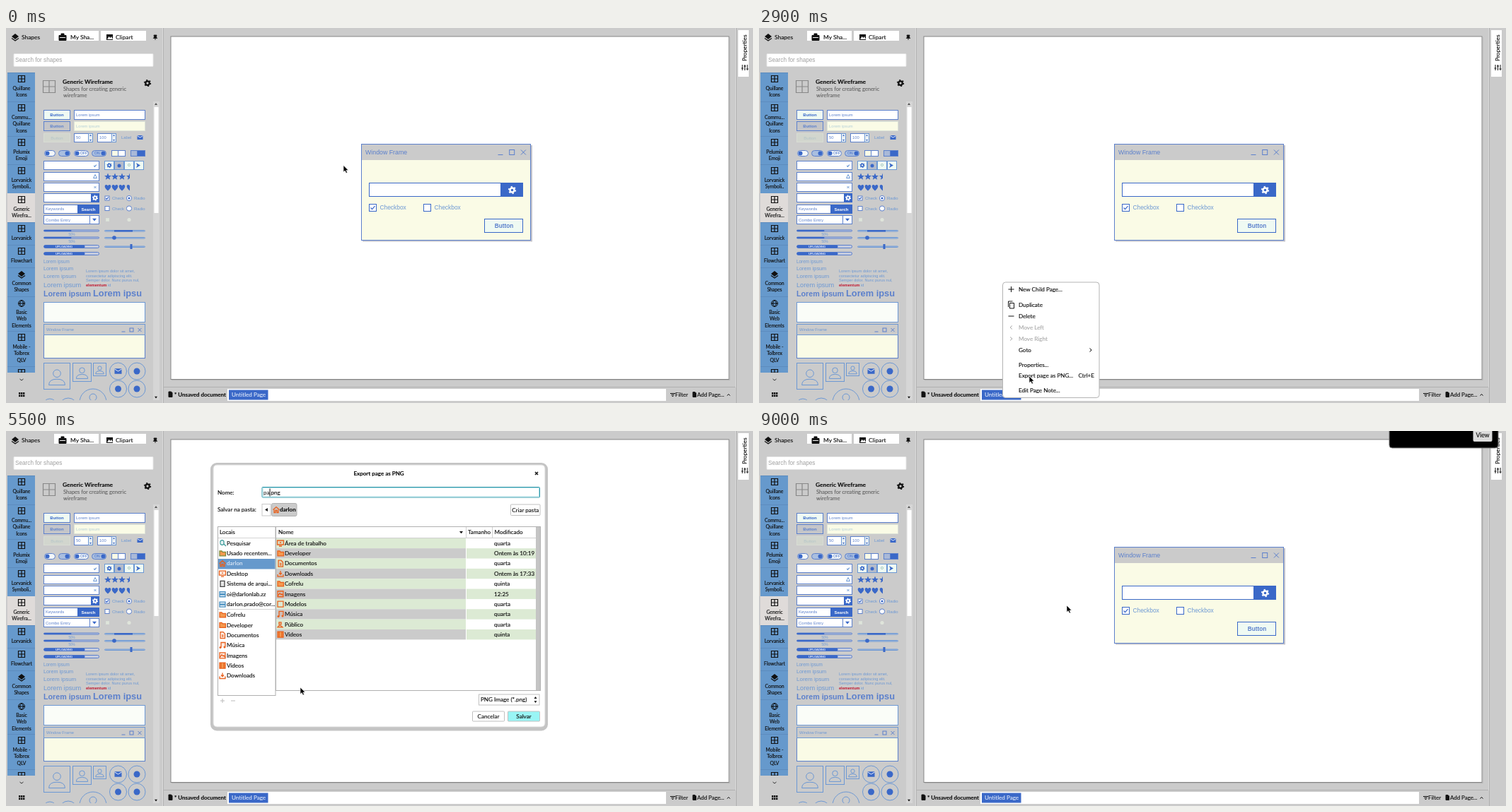
These frames come from a looping animation (1056x531 px, 9.1 s). An HTML page:

```html
<!DOCTYPE html>
<html lang="en">
<head>
<meta charset="utf-8">
<title>Export a page</title>
<style>
  html, body { margin: 0; width: 100%; height: 100%; overflow: hidden; background: #cbcbcb; }
  svg { display: block; width: 1056px; height: 531px; font-family: Lato, sans-serif; }
  svg svg { width: auto; height: auto; }
  text { white-space: pre; }
  .wire text { font-family: "Liberation Sans", Arial, sans-serif; stroke: none; }
</style>
</head>
<body>
<svg id="stage" viewBox="0 0 1056 531"></svg>
<script>
const BLUE = '#3a68c8', EDGE = '#5c80cc', SOFT = '#6c98d4', GREY = '#cbcbcb', CREAM = '#fafbe6', MINT = '#effaf3';
const ORANGE = '#e8601c', TAB = '#6699cc';

// Drawing helpers: every one returns SVG markup.
const R = (x, y, w, h, fill = 'none', stroke = 'none', rx = 0) =>
  `<rect x="${x}" y="${y}" width="${w}" height="${h}" fill="${fill}" stroke="${stroke}" rx="${rx}"/>`;
const B = (x, y, w, h, fill, stroke = EDGE, rx) => R(x + .5, y + .5, w - 1, h - 1, fill, stroke, rx);
const C = (x, y, r, fill = 'none', stroke = 'none', extra = '') =>
  `<circle cx="${x}" cy="${y}" r="${r}" fill="${fill}" stroke="${stroke}" ${extra}/>`;
const P = (d, stroke = '#000', fill = 'none', width = 1) =>
  `<path d="${d}" stroke="${stroke}" fill="${fill}" stroke-width="${width}"/>`;
const T = (x, y, text, size = 8.1, fill = '#111', extra = '') =>
  `<text x="${x}" y="${y + size * .34}" font-size="${size}" fill="${fill}" stroke="${fill}" stroke-width=".15" ${extra}>${text}</text>`;
const G = (x, y, body) => `<g transform="translate(${x} ${y})">${body}</g>`;
const MID = 'text-anchor="middle"', BOLD = ' font-weight="bold"';

const grid = (x, y, s, color = '#111', w = 1.2) =>
  P(`M${x - s} ${y - s}h${2 * s}v${2 * s}h${-2 * s}zM${x} ${y - s}v${2 * s}M${x - s} ${y}h${2 * s}`, color, 'none', w);
const gear = (x, y, r, color) =>
  C(x, y, r * .55, 'none', color, `stroke-width="${r * .45}"`) +
  C(x, y, r * .85, 'none', color, `stroke-width="${r * .35}" stroke-dasharray="${r * .38} ${r * .51}"`);
const layers = (x, y) => G(x, y, P('M0-5L5-1L0 3L-5-1z', 'none', '#111') + P('M-5 1.5L0 5L5 1.5', '#111', 'none', 1.2));
const mail = (x, y, w) => G(x, y, R(-w, -w * .75, 2 * w, w * 1.5, BLUE) + P(`M${-w} ${-w * .6}L0 0L${w} ${-w * .6}`, '#e8eefa'));
const tick = (x, y, s, color = BLUE) => P(`M${x - s} ${y}l${s * .7} ${s * .7}l${s * 1.3} ${-s * 1.5}`, color, 'none', 1.2);
const cross = (x, y, s, color) => P(`M${x - s} ${y - s}l${2 * s} ${2 * s}m0 ${-2 * s}l${-2 * s} ${2 * s}`, color);
const down = (x, y, s, color = '#111') => P(`M${x - s} ${y - s * .6}h${2 * s}l${-s} ${s * 1.3}z`, 'none', color);
const person = (x, y, s) => B(x, y, s, s, 'none', SOFT) + G(x + s / 2, y + s / 2,
  C(0, -s * .1, s * .14, 'none', SOFT) + P(`M${-s * .3} ${s * .33}q0 ${-s * .22} ${s * .3} ${-s * .22}t${s * .3} ${s * .22}z`, SOFT));
const titleButtons = (x, y, s, gap, color) => P(`M${x - s} ${y + s}h${2 * s}`, color) +
  R(x + gap - s, y - s, 2 * s, 2 * s, 'none', color) + cross(x + 2 * gap, y, s, color);

function sidebar() {
  const cells = [
    [63, 'Quillane|Icons'], [104, 'Commu...|Quillane|Icons'], [153, 'Pelumix|Emoji'], [193, 'Lorvanick|Symboli..'],
    [234, 'Generic|Wirefra...'], [275, 'Lorvanick'], [307, 'Flowchart'], [339, 'Common|Shapes'],
    [380, 'Basic|Web|Elements'], [429, 'Mobile -|Tolbrex|QLV'], [479, '']];
  const body = cells.map(([y, label], i) => {
    const icon = i == 7 ? layers(22, y + 10)
      : i == 8 ? C(22, y + 10, 4.5, 'none', '#111') + P(`M17.5 ${y + 10}h9M22 ${y + 5.5}q-5 4.5 0 9q5-4.5 0-9`)
      : grid(22, y + 9, 4.5);
    return (i == 4 ? R(2, y, 39, 41, '#dfdbd9') : P(`M2 ${y + .5}h39`, '#5d8cbe')) + icon +
      label.split('|').map((line, n) => T(22, y + 22.5 + n * 9.4, line, 6.8, '#111', MID)).join('');
  }).join('');
  return R(2, 63, 39, 425, TAB) + `<svg x="0" y="0" width="43" height="488">${body}</svg>` +
    P('M19.5 497l2.5 2l2.5-2', '#333') +
    [0, 1, 2].map(i => R(18 + i * 3, 516, 2.4, 2.6, '#111') + R(18 + i * 3, 519.5, 2.4, 2.6, '#111')).join('');
}

function palette() {
  let s = '';
  const text = (x, y, str, size = 5.8, color = SOFT, extra) => s += T(x, y, str, size, color, extra);
  const box = (...a) => s += B(...a);

  box(53, 116, 38, 14, MINT); text(72, 123, 'Button', 6, BLUE, MID + BOLD);
  box(53, 132, 38, 14, '#c4c5c9'); text(72, 139, 'Button', 6, EDGE, MID + BOLD);
  box(53, 149, 38, 13, '#d2d6ce', '#d8dcd4'); text(72, 155.5, 'Button', 6, '#b2c4c8', MID);
  box(96, 116, 101, 14, '#fff'); text(99, 123, 'Lorem ipsum', 5.8, EDGE);
  box(96, 132, 101, 14, CREAM, '#dde4d8'); text(99, 139, 'Lorem ipsum', 5.8, '#b4cfd8');
  [[96, '50'], [129, '100']].forEach(([x, n]) => {
    box(x, 149, 21, 13, '#fff'); text(x + 3, 155.5, n, 5.8, EDGE);
    box(x + 20, 149, 7, 13, '#e8eef2', SOFT);
    s += down(x + 23.5, 159, 1.6, BLUE) + P(`M${x + 22} 153h3l-1.5-2z`, 'none', BLUE);
  });
  text(163, 155.5, 'Label'); s += mail(189.5, 155, 4);

  [[54, 16, 0, ''], [74, 17, 1, ''], [96, 21, 0, 'OFF'], [121, 21, 1, 'ON']].forEach(([x, w, on, label]) => {
    box(x, 173, w, 9, on ? '#a9bedf' : '#f2f6f8', EDGE, 4);
    s += C(on ? x + w - 4.5 : x + 4.5, 177.5, 3, BLUE);
    if (label) text(x + (on ? 4 : 9), 177.5, label, 5, BLUE);
  });
  box(149, 173, 20, 9, '#fff'); s += R(149.5, 173.5, 9, 8, CREAM, EDGE);
  box(176, 173, 21, 9, BLUE); s += R(176.5, 173.5, 9, 8, '#a9b9d8', EDGE);

  [188, 203.5, 219, 234, 249.5, 265].forEach(y => box(53, Math.round(y), 79, 13, '#fff'));
  s += tick(126, 195, 1.8, SOFT) + P('M126 207.5l2.5 5h-5z', SOFT) + cross(126, 225.5, 1.4, SOFT);
  s += R(120, 234, 12, 13, BLUE) + gear(126, 240.5, 4, '#fff');
  s += R(101, 250, 31, 13, BLUE); text(116.5, 256.5, 'Search', 6, '#fff', MID + BOLD);
  text(56, 256, 'Keywords', 6, EDGE); text(56, 271.5, 'Combo Entry', 6, EDGE);
  s += P('M118.5 265v13', EDGE) + down(125, 271.5, 3, BLUE);

  [0, 1, 2, 3].forEach(i => box(139 + i * 14, 188, 14, 13, i == 1 ? '#b4bccb' : MINT, SOFT));
  s += gear(146, 194.5, 3.5, BLUE) + C(160, 195, 2.5, BLUE) + C(174, 194, 1.6, 'none', '#a8c8c0') +
    P('M184 191l6 3.5l-6 3.5l1.5-3.5z', 'none', BLUE);
  const star = 'M0-5L1.4-1.6L5-1.5L2.2.8L3.1 4.3L0 2.3L-3.1 4.3L-2.2.8L-5-1.5L-1.4-1.6z';
  const heart = 'M0 4.5C-8-2-3-6.5 0-2.5C3-6.5 8-2 0 4.5z';
  [0, 1, 2].forEach(i => s += G(144 + i * 10, 210.5, P(star, 'none', BLUE)) + G(144 + i * 10, 226, P(heart, 'none', BLUE)));
  s += G(175, 210.5, P('M0-5V2.3L-3.1 4.3L-2.2.8L-5-1.5L-1.4-1.6z', 'none', BLUE)) +
    G(175, 226, P('M0 4.5C-8-2-3-6.5 0-2.5z', 'none', BLUE));
  [241, 255.5].forEach((y, i) => {
    box(139.5, y - 3.5, 7, 7, '#fff'); s += C(174, y, 3.6, '#fff', EDGE);
    if (!i) s += tick(143, y, 1.8) + C(174, y, 1.6, BLUE);
    text(150, y, 'Check', 6); text(181, y, 'Radio', 6);
  });
  box(141, 269, 5, 5, '#dfe4da', '#d8e0d8'); s += C(174, 271.5, 2.6, '#dfe4da');

  [287, 297, 309.5, 319.5].forEach((y, i) => {
    const upload = i > 1, h = upload ? 4 : 2;
    s += R(53.5, y - h / 2, 78, h, '#c4cce0', EDGE, h / 2) + R(53.5, y - h / 2, upload ? 58 : 39, h, BLUE, 'none', h / 2);
    if (upload) text(82, y, 'UPLOADING', 4, '#e8f0ff', MID + BOLD);
    else text(93, y + 5, '50%', 4.5, SOFT, MID);
  });
  [287, 297, 309.5].forEach(y => s += R(139.5, y - .5, 57, 1.5, '#b4c4e0', SOFT, 1));
  s += R(153, 286, 26, 2.5, BLUE) + C(153, 297, 2.8, BLUE) + R(175.5, 306, 3, 7, BLUE);

  [[331, 6.4], [341, 7.3], [351, 8], [364, 9.2]].forEach(([y, size]) => text(53, y, 'Lorem ipsum', size));
  text(53, 376.5, 'Lorem ipsum', 10.7, EDGE, BOLD); text(123, 376, 'Lorem ipsu', 12.8, EDGE, BOLD);
  ['Lorem ipsum dolor sit amet,', 'consectetur adipiscing elit.', 'Semper dolor. Nunc purus nul,',
    `<tspan fill="#c01830" font-weight="bold">elementum</tspan> id`]
    .forEach((line, i) => text(113, 344.5 + i * 6.4, line, 5.6));

  box(53, 388, 144, 29, '#fafdf8', SOFT);
  box(53, 419, 144, 49, CREAM); s += R(53.5, 419.5, 143, 15, GREY, SOFT);
  text(57, 427.5, 'Window Frame', 5.8); s += titleButtons(166, 427.5, 2.5, 11.5, EDGE);
  s += person(53, 474, 38) + person(94, 474, 27) + person(123, 474, 19);
  [[158.5, 486], [185, 486], [158.5, 511], [185, 511]].forEach(([x, y], i) =>
    s += C(x, y, 12, 'none', SOFT) + (i ? C(x, y, 4.5, BLUE) : mail(x, y, 5)));
  s += C(123, 530, 19, 'none', SOFT) + C(123, 523, 5, 'none', SOFT) + C(88, 537, 13, 'none', SOFT) + C(62, 535, 10, 'none', SOFT);
  return `<svg class="wire" x="0" y="0" width="208" height="527">${s}</svg>`;
}

function chrome() {
  return R(0, 0, 1056, 531, GREY) + P('M222.5 0v531M1032.5 0v531M223 508.5h809', '#b0b0b0') + P('M221.5 0v531M1031.5 0v509', '#dcdcdc') +
    R(233, 12, 789, 485.5, '#fff', '#858585') + P('M234 498.5h789M1023 13v486', '#b4b4b4') +
    layers(13, 13) + T(22, 13, 'Shapes', 8.4) +
    R(68, 4, 63, 14, '#fff') + P('M75 10.5h10v7h-10zM78 10v-2h4v2', '#111', '#111') + P('M76 13.5h8', '#fff') + T(91, 13, 'My Sha...', 8.4) +
    R(134, 4, 64, 14, '#fff') + R(142, 9, 9, 8, '#111') + P('M143 16l2.5-4l2 2l1.5-2l2 4z', 'none', '#fff') + T(155, 13, 'Clipart', 8.4) +
    P('M209 10h4l-.5 3l1.2 1.5h-5.4l1.2-1.5zM211 14v3', '#111', '#111', .8) +
    R(11, 36.5, 197, 18, '#fff', '#e4e4e4', 1) + `<g class="wire">${T(13, 45, 'Search for shapes', 8.2, '#a0a0a0')}</g>` +
    grid(61, 83, 8.5, '#888') + T(80, 76, 'Generic Wireframe', 8.4, '#111', BOLD) +
    T(81, 86, 'Shapes for creating generic', 7.5, '#666') + T(81, 95, 'wireframe', 7.5, '#666') + gear(200, 78, 5, '#111') +
    sidebar() + palette() +
    R(208, 104, 9, 423, '#d6d6d6') + R(209.5, 112, 6, 150, '#fff') + P('M210 109h4l-2-3z', 'none', '#555') + down(212, 523, 2) +
    // page bar
    P('M230 515h3.5l1.5 1.5v6h-5z', '#111', '#111') + T(238, 519.5, '* Unsaved document', 7.9, '#111', BOLD) +
    R(313, 511, 620, 17, '#fff') + R(315, 512.5, 55.5, 14, BLUE) + T(319, 519.5, 'Untitled Page', 8.1, '#dce6f8') +
    P('M939 517.5h7M940.5 519.5h4M941.5 521.5h2') + T(946, 519.5, 'Filter', 7.9) +
    P('M971 515.5h3l1.5 1.5v5.5h-4.5z', '#111', '#111') + T(977, 519.5, 'Add Page...', 7.9) + P('M1019.5 520.5l2-2l2 2') +
    // properties tab
    R(1035, 3, 15, 66, '#fff') + `<g transform="translate(1044.5 47) rotate(-90)">${T(0, 0, 'Properties', 8.3)}</g>` +
    P('M1041 52v8M1044.5 52v8M1048 52v8M1039.5 57h3M1043 54h3M1046.5 58h3', '#111');
}

function windowFrame() {
  return `<g class="wire">` + R(504, 166, 240, 136.5, '#c4c4cc') + B(502, 164, 240, 137, CREAM) +
    R(503, 165, 238, 22, GREY) + T(508, 176.5, 'Window Frame', 8.8, EDGE) + titleButtons(699, 176, 3.5, 16.2, EDGE) +
    B(513, 219, 187, 20, '#fff', BLUE) + R(700, 219, 31, 20, BLUE) + gear(715.5, 229.5, 5.5, '#fff') +
    [[513, 1], [590, 0]].map(([x, on]) => B(x, 249, 11, 11, '#fff', BLUE) + (on ? tick(x + 5.5, 254.5, 3) : '') +
      T(x + 15.5, 254.5, 'Checkbox', 8.4, SOFT)).join('') +
    R(676.5, 270.5, 54, 19, MINT, BLUE) + T(704, 280.5, 'Button', 8.2, EDGE, MID + BOLD) + '</g>';
}

function menu() {
  const items = [[370, 'New Child Page...', 'M-4 0h8M0-4v8'], [392, 'Duplicate', 'M-2-2.5h6v7.5h-6zM-4 3v-8h6'], [408, 'Delete', 'M-4 0h8'],
    [424, 'Move Left', 'M1.5-2.5l-3 2.5l3 2.5'], [440, 'Move Right', 'M-1.5-2.5l3 2.5l-3 2.5'], [456, 'Goto'],
    [477.5, 'Properties...'], [492.5, 'Export page as PNG...'], [513.5, 'Edit Page Note...']];
  return R(344.5, 360, 136.5, 163.5, '#fff', '#b4b4b4', 4) +
    items.map(([y, label, icon], i) => {
      const color = i == 3 || i == 4 ? '#aaa' : '#111';
      return T(367, y, label, 8.1, color) + (icon ? G(356.5, y, P(icon, color)) : '');
    }).join('') + P('M467.5 453.5l2.5 2.5l-2.5 2.5') + T(474, 492.5, 'Ctrl+E', 8.1, '#111', 'text-anchor="end"');
}

const ICONS = {
  folder: 'M-4-3.5h3l1 1.5h4.5v5.5h-8.5z', doc: 'M-3-4.5h4l2.5 2.5v6.5h-6.5zM-1 0h2.5M-1 2h2.5', down: 'M0-4v5M-2-1l2 2l2-2M-4 1v3h8v-3',
  home: 'M-4.5 0l4.5-4l4.5 4M-3 0v4h2v-3h2v3h2v-4', music: 'M-2 3v-7h6v6', image: 'M-4-4h8v8h-8zM-4 3l3-4l2 2l1-1l2 3',
  video: 'M-4-4h8v8h-8zM-2-4v8M2-4v8', screen: 'M-4.5-4h9v6h-9zM-2 4h4M-1-1h2', model: 'M-4-4h8v8h-8z', people: 'M-2-3h3v3h-3zM-4 4q2.5-5 7 0z',
  search: 'M-3-1a2.6 2.6 0 1 1 5 0a2.6 2.6 0 1 1-5 0M2 1l3 3', disk: 'M-3-4h6v8h-6z', net: 'M-4-3h8v3h-8zM-4 1h8v3h-8z'
};
const icon = (name, x, y, color = ORANGE) => G(x, y, P(ICONS[name], color,
  name == 'folder' || name == 'video' ? '#f49a50' : name == 'model' ? 'none' : color + '22', 1.3) +
  (name == 'music' ? C(-3, 3, 1.5, color) + C(3, 2.5, 1.5, color) : ''));
const USER = 'darlon', CLOUD = 'Cofrelu';

function dialog() {
  const places = [['search', 'Pesquisar', '#3a9a9a'], ['folder', 'Usado recentem...', '#7a8a3a'], ['home', USER], ['screen', 'Desktop'],
    ['disk', 'Sistema de arqui...', '#444444'], ['net', 'oi@darlonlab.zz', '#4a90c0'], ['net', 'darlon.prado@cor...', '#4a90c0'],
    ['folder', CLOUD], ['folder', 'Developer'], ['doc', 'Documentos'], ['music', 'Música'], ['image', 'Imagens'], ['video', 'Vídeos'], ['down', 'Downloads']];
  const files = [['screen', 'Área de trabalho', 'quarta'], ['folder', 'Developer', 'Ontem às 10:19'], ['doc', 'Documentos', 'quarta'],
    ['down', 'Downloads', 'Ontem às 17:33'], ['folder', CLOUD, 'quinta'], ['image', 'Imagens', '12:25'], ['model', 'Modelos', 'quarta'],
    ['music', 'Música', 'quarta'], ['people', 'Público', 'quarta'], ['video', 'Vídeos', 'quinta']];
  const row = i => 159 + i * 14.35;
  const button = (x, y, w, h, label, fill = '#fff') => R(x, y, w, h, fill, '#c0c0c0', 1) + T(x + w / 2, y + h / 2, label, 8.1, '#111', MID);
  return R(289, 45, 477, 379.5, '#c4c4c4', 'none', 9).replace('<rect', '<rect id="halo"') +
    R(293, 48, 469, 371, '#fff', '#d8d8d8', 5) +
    T(527, 60, 'Export page as PNG', 8, '#111', MID + BOLD) + P('M748 58l4 4m0-4l-4 4', '#111', 'none', 1.5) +
    T(299, 87, 'Nome:') + R(362, 79.5, 392.5, 14.5, '#fff', '#2f96a8', 1) + R(363, 80.5, 390.5, 12.5, 'none', '#a8dce4') +
    '<rect id="selection" x="363" y="81" height="12" fill="#6699cc"/>' +
    T(364, 87, '<tspan id="typed" stroke="none"></tspan>.png') + '<rect id="caret" y="81.5" width="1" height="11" fill="#111"/>' +
    T(299, 111.5, 'Salvar na pasta:') + R(362, 103.5, 12, 16.5, '#fff', '#c8c8c8') + P('M370 109v5l-4-2.5z', 'none', '#222') +
    R(375.5, 102.5, 35.5, 18, GREY, '#b0b0b0', 2) + icon('home', 382, 111.5) + T(387, 111.5, USER, 8, '#111', BOLD) +
    button(713.5, 104, 41.5, 15.5, 'Criar pasta') +
    R(299.5, 135.5, 81.5, 239, '#fff', '#b0b0b0') + T(302, 143.5, 'Locais') + P('M300 151.5h81M300 252.5h81', '#d4d4d4') + R(300, 181, 80.5, 14.5, TAB) +
    places.map(([name, label, color], i) => icon(name, 306, row(i) + (i > 6), color) +
      T(312, row(i) + (i > 6), label, 8.1, i == 2 ? '#dce8f6' : '#111')).join('') +
    R(381.5, 135.5, 374, 232, '#fff', '#b0b0b0') + R(749, 136, 6, 231, '#c4c4c4') +
    T(385, 143.5, 'Nome') + down(643.5, 143.5, 2.5) + T(653, 143.5, 'Tamanho') + T(690.5, 143.5, 'Modificado') +
    files.map(([name, label, date], i) => {
      const y = row(i) - 7.2, odd = i % 2;
      return R(382, y, 268, 14.4, odd ? GREY : '#dcead4') + (odd ? R(651, y, 98, 14.4, '#dcead4') : '') +
        icon(name, 388, row(i)) + T(394, row(i), label) + T(690, row(i), date);
    }).join('') + P('M382 151.5h367M650.5 136v16M687.5 136v16', '#d0d0d0') +
    P('M303 382h6M306 379v6M318 382h6', '#bbb') +
    R(668.5, 373, 85.5, 15, '#fff', '#c0c0c0') + T(671, 380.5, 'PNG Image (*.png)') + down(748.5, 383.5, 2) + P('M746.5 379h4l-2-3z', 'none', '#111') +
    button(659.5, 397, 45, 14, 'Cancelar') + button(709.5, 397, 45, 14, 'Salvar', '#99f5f5').replace('<rect', '<rect id="save"');
}

const notice = R(891, -40, 154, 64, '#000', '#777', 4) + R(1009.5, -8, 27, 23, '#dcdcdc', 'none', 2) + T(1023, 6, 'View', 8.6, '#111', MID);
const arrow = P('M0 0V9.5L2.2 7.6L3.8 11L5.5 10.2L4 7H7z', '#fff', '#000', .6);

const layer = (id, body) => `<g id="${id}">${body}</g>`;
document.getElementById('stage').innerHTML = chrome() + windowFrame() +
  layer('menu', menu()) + layer('dialog', dialog()) + layer('notice', notice) + layer('pointer', arrow);

const $ = id => document.getElementById(id);
const LOOP = 9100;
const pointerPath = [[0, 477, 194.5], [800, 386, 414], [1300, 347, 525], [2100, 347, 525], [2700, 382, 493],
  [3500, 382, 493], [4000, 416, 363], [8000, 416, 363], [8700, 435, 247], [LOOP, 435, 247]];
const keyTimes = [5300, 5500, 5700, 5900, 6200, 6400, 6500, 6700, 6800];
const clamp = v => Math.max(0, Math.min(1, v));

function pointerAt(t) {
  const i = pointerPath.findIndex(k => k[0] > t);
  const [t0, x0, y0] = pointerPath[i - 1], [t1, x1, y1] = pointerPath[i];
  const u = (t - t0) / (t1 - t0), e = u * u * (3 - 2 * u);
  return [x0 + (x1 - x0) * e, y0 + (y1 - y0) * e];
}
const show = (id, on) => $(id).setAttribute('visibility', on ? 'visible' : 'hidden');

function render(t) {
  $('pointer').setAttribute('transform', `translate(${pointerAt(t)})`);
  show('menu', t >= 1700 && t < 3000);

  const closing = t >= 7200, open = t >= 3100 && t < 7400;
  $('dialog').style.display = open ? '' : 'none';
  if (open) {
    const grown = clamp((t - 3000) / 300), shutting = t >= 7300;
    const scale = shutting ? .5 : closing ? .981 : .8 + .2 * grown;
    $('dialog').setAttribute('transform', `translate(0 ${238 * (1 - scale)}) scale(1 ${scale})`);
    $('dialog').setAttribute('opacity', shutting ? .4 : grown);
    $('halo').setAttribute('opacity', closing ? 0 : 1);
    $('save').setAttribute('fill', closing ? GREY : '#99f5f5');

    const count = keyTimes.filter(k => k <= t).length, name = $('typed');
    name.textContent = count ? 'page_test'.slice(0, count) : 'Untitled Page';
    name.setAttribute('fill', count ? '#111' : '#dce8f6');
    const width = name.getComputedTextLength();
    $('selection').setAttribute('width', count ? 0 : width + 1);
    $('caret').setAttribute('x', 364 + width);
    $('caret').setAttribute('opacity', count ? 1 : 0);
  }

  show('notice', t >= 7500);
  $('notice').setAttribute('transform', `translate(0 ${-28 * (1 - clamp((t - 7400) / 300))})`);
}

// The picture advances in steps of a tenth of a second.
function play() {
  render(Math.floor(performance.now() % LOOP / 100) * 100);
  requestAnimationFrame(play);
}
play();
</script>
</body>
</html>
```
